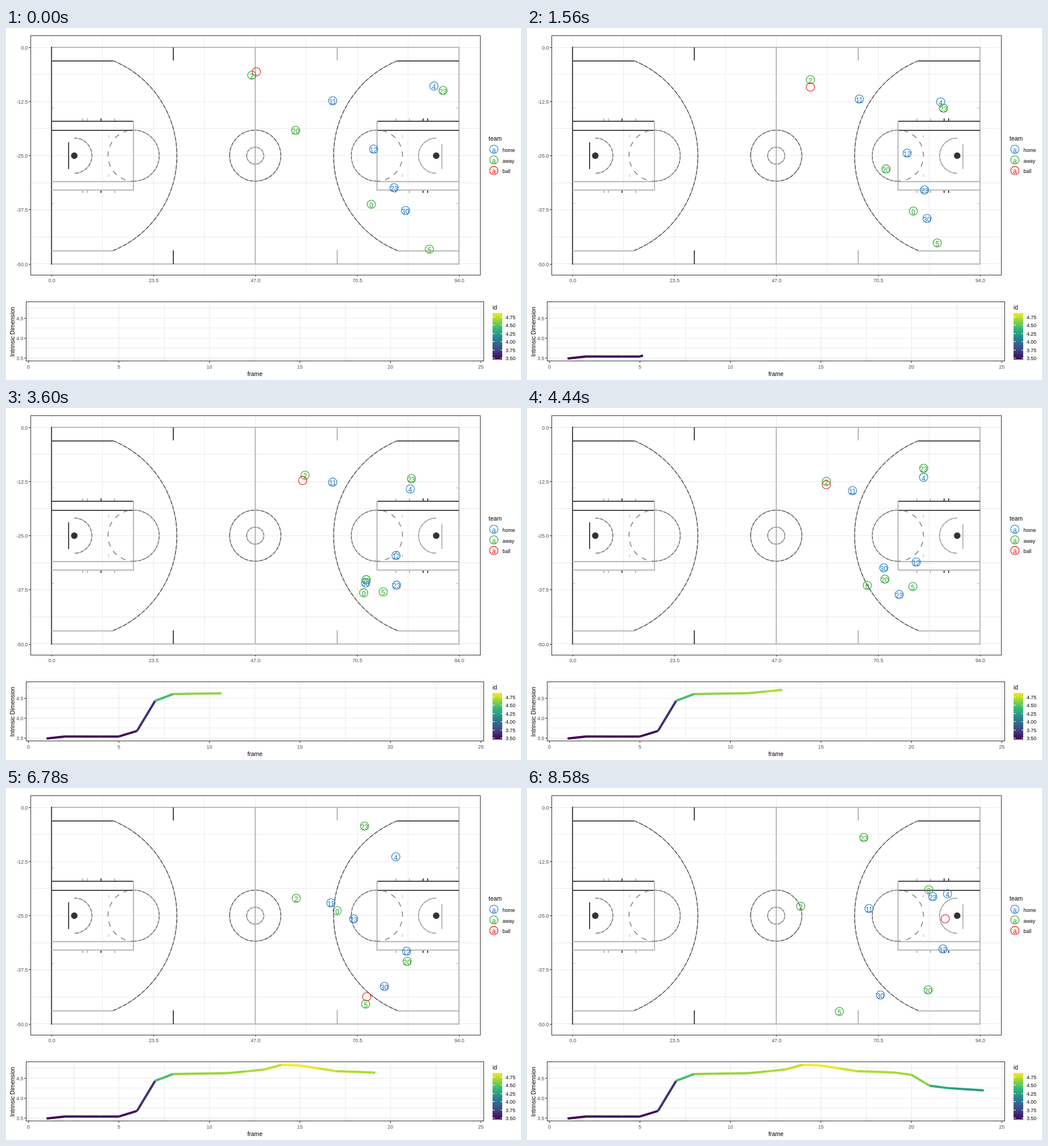
An HTML page for the animation above (8640 ms loop, 905 px wide and 619 px high).

```html
<!DOCTYPE html>
<html lang="en">
<head>
<meta charset="utf-8">
<title>Court movement and intrinsic dimension</title>
<style>
  html, body { margin: 0; width: 100%; height: 100%; overflow: hidden; background: #fff; }
  svg { display: block; width: 905px; height: 619px; font-family: "Liberation Sans", Arial, sans-serif; }
  .straight { shape-rendering: crispEdges; }
  .tick { font-size: 8.8px; fill: #4d4d4d; }
  .label { font-size: 8.8px; }
  .title { font-size: 10.4px; }
  .mark { font-size: 12px; text-anchor: middle; }
</style>
</head>
<body>
<svg id="stage" viewBox="0 0 905 619"></svg>
<script>
const STEP = 60, STEPS = 144, STATES = 24;
const DARK = '#4c4c4c', GREY = '#bababa', GRID = '#ebebeb', AXIS = '#333';
const TEAM = { home: '#1874cd', away: '#22a022', ball: '#ee1111' };
const VIRIDIS = ['440154', '3e4a89', '26828e', '35b779', 'b4de2c', 'fde725'];
const VIRIDIS_AT = [0, 2 / 9, 4 / 9, 6 / 9, 8 / 9, 1];

const stage = document.getElementById('stage');
const parts = [];
const add = s => parts.push(s);
const line = (x1, y1, x2, y2, color, w = 2) =>
  add(`<line class="straight" x1="${x1}" y1="${y1}" x2="${x2}" y2="${y2}" stroke="${color}" stroke-width="${w}"/>`);
const frame = (x, y, w, h) =>
  add(`<rect x="${x}" y="${y}" width="${w}" height="${h}" fill="none" stroke="${AXIS}"/>`);
const text = (x, y, s, cls, anchor = 'start', extra = '') =>
  add(`<text x="${x}" y="${y}" class="${cls}" text-anchor="${anchor}" ${extra}>${s}</text>`);
const crisp = v => Math.floor(v) + 0.5;
const range = (n, from, step) => Array.from({ length: n }, (_, i) => from + i * step);

// Pencil-like curve: pale stroke with darker dashes over it
function curve(d, dark = '#444', dash = '7 3') {
  add(`<path d="${d}" fill="none" stroke="#aaa" stroke-width="1.5"/>`);
  add(`<path d="${d}" fill="none" stroke="${dark}" stroke-width="1.2" stroke-dasharray="${dash}"/>`);
}
const ring = (x, y, r) => `M${x - r} ${y}a${r} ${r} 0 1 1 ${2 * r} 0a${r} ${r} 0 1 1 ${-2 * r} 0`;

function gridLines(xs, ys, x0, y0, x1, y1) {
  xs.forEach(x => line(crisp(x), y0, crisp(x), y1, GRID, 1));
  ys.forEach(y => line(x0, crisp(y), x1, crisp(y), GRID, 1));
}

function drawCourtAxes() {
  gridLines(range(9, 80, 89.5), range(9, 34, 47.6), 44, 14, 833, 434);
  for (let i = 0; i < 5; i++) {
    const x = crisp(80 + i * 179), y = crisp(34 + i * 95.25);
    line(x, 434, x, 437, AXIS, 1);
    line(40, y, 43, y, AXIS, 1);
    text(x, 447, (i * 23.5).toFixed(1), 'tick', 'middle');
    text(38.5, y + 3, (i ? '-' : '') + (i * 12.5).toFixed(1), 'tick', 'end');
  }
}

function drawHalf(left) {
  const X = v => left ? v : 876 - v;
  const hoop = X(120), key = X(224.3), sweep = left ? 1 : 0;
  line(X(80), 57.5, X(188), 57.5, DARK);
  line(X(80), 391.5, X(188), 391.5, GREY);
  curve(`M${X(188)} 57.5A180.3 180.3 0 0 ${sweep} ${X(188)} 391.5`);

  line(X(80), 164, X(224), 164, DARK);
  line(X(80), 179.5, X(224), 179.5, DARK);
  line(X(80), 269.5, X(224), 269.5, GREY);
  line(X(80), 285, X(224), 285, GREY);
  line(key, 163, key, 286, GREY);
  curve(`M${key} 179.5a45 45 0 0 ${sweep} 0 90`, '#666', '5 3');
  add(`<path d="M${key} 179.5a45 45 0 0 ${1 - sweep} 0 90" fill="none" stroke="#777" stroke-width="1.4" stroke-dasharray="9 9.1" stroke-dashoffset="-9"/>`);
  [188, 257].forEach(y => line(X(180), y, X(180), y + 5, GREY, 1));

  curve(`M${hoop} 193.5a31 31 0 0 ${sweep} 0 62`, left ? '#666' : '#999', '5 4');
  line(X(110), left ? 201 : 204, X(110), 248, left ? DARK : GREY);
  add(`<circle cx="${hoop}" cy="224.5" r="5.7" fill="#333"/>`);

  [135, 143, 167, 191].forEach((v, i) => {
    const color = (left ? i === 2 : i < 2) ? DARK : GREY;
    line(X(v), 159, X(v), 163, color);
    line(X(v), 286, X(v), 290, color);
  });
  [140, 308.5].forEach(y => line(X(81), y, X(85), y, GREY, 1));
  const side = left ? 293.8 : 582, color = left ? DARK : GREY;
  line(side, 34, side, 57, color);
  line(side, 391, side, 415, color);
}

function drawCourt() {
  drawCourtAxes();
  line(79, 33.5, 797, 33.5, GREY);
  line(79, 415, 797, 415, GREY);
  line(796.3, 33, 796.3, 416, GREY);
  line(437.8, 33, 437.8, 416, GREY);
  line(79.7, 33, 79.7, 416, DARK);
  drawHalf(true);
  drawHalf(false);
  curve(ring(438, 224.5, 45), '#555', '6 3');
  curve(ring(438, 224.5, 15), '#777', '4 3');
  frame(43.5, 13.5, 790, 421);
}

const chartX = f => 39.5 + f * 31.8;
const chartY = v => 580.5 - (v - 3.5) * 70.5;

function drawChart() {
  gridLines(range(11, 39.5, 79.5), range(6, 492.5, 17.6), 36, 482, 839, 585);
  for (let f = 0; f <= 25; f += 5) {
    const x = crisp(chartX(f));
    line(x, 586, x, 589, AXIS, 1);
    text(x, 598.5, f, 'tick', 'middle');
  }
  [3.5, 4, 4.5].forEach(v => {
    const y = crisp(chartY(v));
    line(32, y, 35, y, AXIS, 1);
    text(30.5, y + 3, v.toFixed(1), 'tick', 'end');
  });
  text(437.5, 612, 'frame', 'title', 'middle');
  text(0, 0, 'Intrinsic Dimension', 'title', 'middle', 'transform="translate(14.5 534) rotate(-90)"');
  add('<g id="trace" stroke-width="4"></g>');
  frame(35.5, 481.5, 804, 104);
}

const marker = (x, y, team, label) =>
  `<g transform="translate(${x} ${y})"><circle r="7.3" fill="none" stroke="${TEAM[team]}" stroke-width="1.1"/>` +
  `<text class="mark" y="5.6" fill="${TEAM[team]}">${label}</text></g>`;

function drawLegends() {
  text(848, 198, 'team', 'title');
  Object.keys(TEAM).forEach((team, i) => {
    add(marker(857.3, 213.3 + i * 18.7, team, 'a'));
    text(872.5, 217.8 + i * 18.7, team, 'label');
  });
  text(855, 495, 'id', 'title');
  const stops = VIRIDIS.map((c, i) => `<stop offset="${VIRIDIS_AT[i]}" stop-color="#${c}"/>`).join('');
  add(`<defs><linearGradient id="scale" x1="0" y1="1" x2="0" y2="0">${stops}</linearGradient></defs>`);
  add('<rect x="855" y="501" width="17" height="82" fill="url(#scale)"/>');
  for (let i = 0; i < 6; i++) {
    const y = crisp(508 + i * 14.5);
    line(855, y, 858.5, y, '#fff', 1);
    line(868.5, y, 872, y, '#fff', 1);
    text(878, y + 3, (4.75 - i * 0.25).toFixed(2), 'label');
  }
}

// Waypoints "x,y" at the key states; "-" lets the player glide through
const KEY_STATES = [1, 5.17, 8.17, 12.86, 15.5, 19.17, 24];
const track = (team, label, path) => ({
  team, label,
  points: path.split(' ')
    .map((p, i) => [KEY_STATES[i], ...p.split(',').map(Number)])
    .filter(p => p.length === 3)
});
const tracks = [
  track('home', '11', '574,128 584,125 577,123 - 571,166 571,202 601,212'),
  track('home', '4', '752,102 727,130 722,155 - 687,108 685,121 739,186'),
  track('home', '23', '682,281 - 705,289 654,328 593,290 611,230 713,191'),
  track('home', '12', '646,213 668,220 687,242 684,271 - 704,287 731,283'),
  track('home', '30', '702,321 703,335 646,340 627,281 671,305 665,349 621,364'),
  track('away', '2', '432,83 498,91 524,108 526,129 - 510,194 481,208'),
  track('away', '20', '509,180 631,248 638,303 629,301 636,312 705,305 705,355'),
  track('away', '23', '768,110 732,141 725,139 697,106 - 630,67 592,87'),
  track('away', '0', '642,310 679,322 661,331 598,312 575,239 582,216 706,179'),
  track('away', '5', '744,389 721,378 648,345 678,314 682,366 632,380 549,393'),
  track('ball', '', '440,77 498,104 517,121 526,135 576,230 634,367 735,230')
];

// Index of the span between neighbouring keys that holds s
function spanAt(keys, s) {
  let i = 0;
  while (i < keys.length - 2 && s > keys[i + 1][0]) i++;
  return i;
}

// Monotone cubic interpolation: smooth, never beyond the neighbouring waypoints
function glide(points, s, axis) {
  const slope = k => points[k] && points[k + 1]
    ? (points[k + 1][axis] - points[k][axis]) / (points[k + 1][0] - points[k][0]) : null;
  const tangent = k => {
    const a = slope(k - 1) ?? slope(k), b = slope(k) ?? a;
    return a * b <= 0 ? 0 : 2 * a * b / (a + b);
  };
  const i = spanAt(points, s), h = points[i + 1][0] - points[i][0];
  const u = (s - points[i][0]) / h, v = 1 - u;
  return points[i][axis] * (1 + 2 * u) * v * v + points[i + 1][axis] * u * u * (3 - 2 * u)
    + h * u * v * (tangent(i) * v - tangent(i + 1) * u);
}

// Corners of the dimension curve: [state, value]
const CORNERS = [[1, 3.49], [2, 3.54], [5, 3.54], [6, 3.68], [7, 4.43], [8, 4.6], [11, 4.62], [13, 4.71],
  [14, 4.83], [15, 4.81], [17, 4.67], [19, 4.64], [20, 4.58], [21, 4.31], [22, 4.25], [24, 4.19]];

function dimension(s) {
  const i = spanAt(CORNERS, s), [s0, v0] = CORNERS[i], [s1, v1] = CORNERS[i + 1];
  return v0 + (v1 - v0) * (s - s0) / (s1 - s0);
}

function viridis(value) {
  const pos = (value - 3.49) / 1.34;
  let i = 0;
  while (i < VIRIDIS.length - 2 && pos > VIRIDIS_AT[i + 1]) i++;
  const mix = (pos - VIRIDIS_AT[i]) / (VIRIDIS_AT[i + 1] - VIRIDIS_AT[i]);
  const rgb = hex => [0, 2, 4].map(k => parseInt(hex.slice(k, k + 2), 16));
  const a = rgb(VIRIDIS[i]), b = rgb(VIRIDIS[i + 1]);
  return `rgb(${a.map((c, k) => Math.round(c + (b[k] - c) * mix))})`;
}

function trace(s) {
  let out = '';
  for (let k = 1; k < s; k++) {
    const end = Math.min(s, k + 1);
    out += `<line x1="${chartX(k)}" y1="${chartY(dimension(k))}" x2="${chartX(end)}" y2="${chartY(dimension(end))}" stroke="${viridis(dimension(k))}"/>`;
  }
  return out;
}

// Each state starts on a whole step, so states last six or seven steps
const stateStep = k => Math.round(k * (STEPS - 1) / (STATES - 1));
function stateAt(step) {
  let k = 0;
  while (k < STATES - 2 && step >= stateStep(k + 1)) k++;
  return 1 + k + (step - stateStep(k)) / (stateStep(k + 1) - stateStep(k));
}

drawCourt();
drawChart();
drawLegends();
tracks.forEach(t => add(marker(0, 0, t.team, t.label).replace('<g', '<g class="player"')));
stage.innerHTML = parts.join('');
const players = stage.querySelectorAll('.player');
const traceGroup = document.getElementById('trace');

function render(time) {
  const s = stateAt(Math.floor(time / STEP) % STEPS);
  tracks.forEach(({ points }, i) =>
    players[i].setAttribute('transform', `translate(${glide(points, s, 1)} ${glide(points, s, 2)})`));
  traceGroup.innerHTML = trace(s);
}

const start = performance.now();
function tick() {
  render(performance.now() - start);
  requestAnimationFrame(tick);
}
tick();
</script>
</body>
</html>
```
